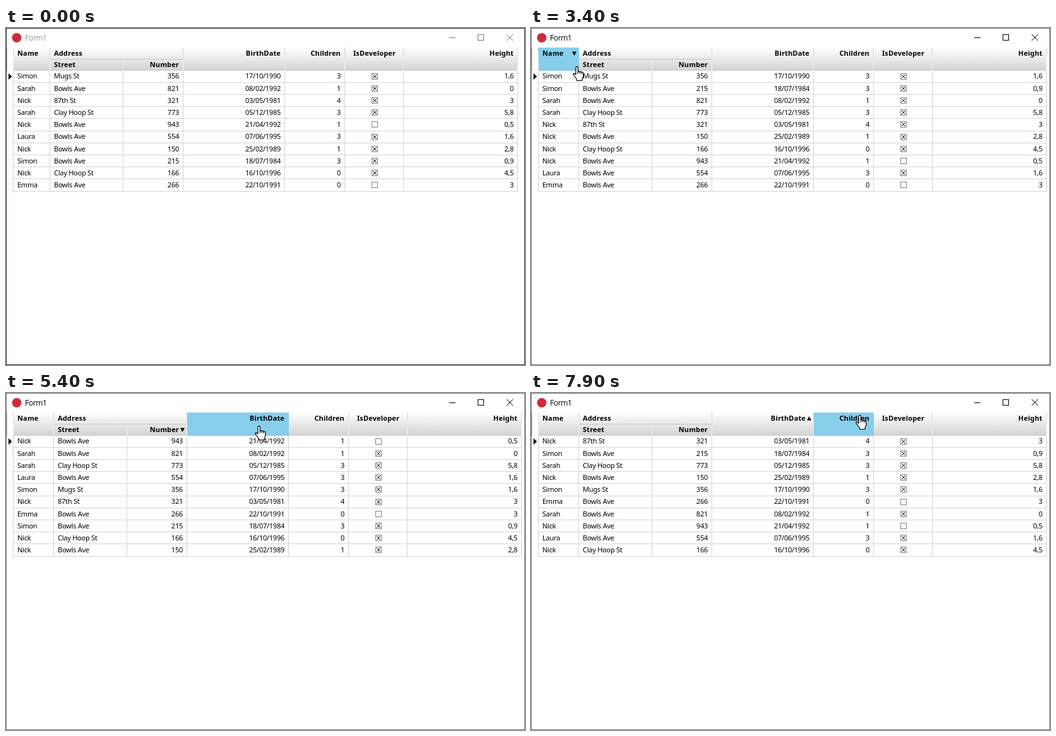
These frames come from a looping animation (822x535 px, 8000 ms). An HTML page with a canvas:

```html
<!DOCTYPE html>
<html lang="en">
<head>
<meta charset="utf-8">
<title>Form1</title>
<style>
html, body { margin: 0; width: 100%; height: 100%; overflow: hidden; background: #fff; }
canvas { display: block; }
</style>
</head>
<body>
<canvas id="stage" width="822" height="535"></canvas>
<script>
const ctx = document.getElementById('stage').getContext('2d');
const LOOP = 8000, STEP = 100, TOP = 31, MID = 49, HEAD = 68, PITCH = 19.2, LINE = '#d5d5d5';

const rows = `Simon|Mugs St|356|17/10/1990|3|x|1,6
Sarah|Bowls Ave|821|08/02/1992|1|x|0
Nick|87th St|321|03/05/1981|4|x|3
Sarah|Clay Hoop St|773|05/12/1985|3|x|5,8
Nick|Bowls Ave|943|21/04/1992|1||0,5
Laura|Bowls Ave|554|07/06/1995|3|x|1,6
Nick|Bowls Ave|150|25/02/1989|1|x|2,8
Simon|Bowls Ave|215|18/07/1984|3|x|0,9
Nick|Clay Hoop St|166|16/10/1996|0|x|4,5
Emma|Bowls Ave|266|22/10/1991|0||3`.split('\n').map(r => r.split('|'));

const titles = ['Name', 'Street', 'Number', 'BirthDate', 'Children', 'IsDeveloper', 'Height'];
const aligns = ['left', 'left', 'right', 'right', 'right', 'center', 'right'];
// each column ends with its grid line
const baseEdges = [11, 69, 185, 280, 441, 536, 629, 810];

// start time, row order, sorted column, direction (1 = ascending)
const sorts = [
  [0, '0123456789', -1, 0],
  [1800, '9568421307', 0, 1],
  [3000, '0713268459', 0, -1],
  [4200, '4135029786', 2, -1],
  [5700, '8541906372', 3, -1],
  [7200, '2736091458', 3, 1]
];

// time, x, y of the pointer
const path = [
  [1400, 150, 200], [1700, 31, 59], [3200, 31, 59], [3400, 66, 61],
  [4000, 233, 65], [4300, 233, 65], [4600, 255, 67], [4900, 277, 61],
  [5000, 277, 61], [5400, 394, 52], [5800, 394, 52], [6000, 432, 60],
  [6100, 432, 60], [6400, 413, 46], [7500, 413, 46], [7900, 514, 35], [LOOP, 514, 35]
];

const hand = new Path2D('M5 2A1.7 1.7 0 0 1 8.4 2V8Q10 7 11.2 8.5Q12.8 7.7 13.9 9.1Q16.6 8.6 16.8 11V15Q16.8 18 15 20V22.5H6.5V20.5Q5 18.5 2.5 15L.9 12.6Q.7 10.6 2.5 11L5 13Z');
const creases = new Path2D('M8.4 8V11.5M11.2 8.5V11.5M13.9 9.1V12');

function rect(x, y, w, h, color) {
  ctx.fillStyle = color;
  ctx.fillRect(x, y, w, h);
}

function text(str, x, y, align = 'left', font = '11px "Noto Sans", sans-serif', spacing = '-0.25px', color = '#000') {
  ctx.font = font;
  ctx.letterSpacing = spacing;
  ctx.textAlign = align;
  ctx.fillStyle = color;
  ctx.fillText(str, x, y);
}

const heading = (str, x, y, align) => text(str, x, y, align, 'bold 11px "Noto Sans", sans-serif', '0.15px');

function strokeLines(color, ...lines) {
  ctx.strokeStyle = color;
  ctx.lineWidth = 1;
  ctx.beginPath();
  for (const [x1, y1, x2, y2] of lines) {
    ctx.moveTo(x1, y1);
    ctx.lineTo(x2, y2);
  }
  ctx.stroke();
}

function triangle(...p) {
  ctx.fillStyle = '#000';
  ctx.beginPath();
  ctx.moveTo(p[0], p[1]);
  ctx.lineTo(p[2], p[3]);
  ctx.lineTo(p[4], p[5]);
  ctx.fill();
}

function gradient(from, to) {
  const g = ctx.createLinearGradient(0, TOP, 0, HEAD);
  g.addColorStop(0, from);
  g.addColorStop(1, to);
  return g;
}

function pointerAt(t) {
  if (t < path[0][0]) return null;
  const i = path.findIndex(p => p[0] > t);
  const [t0, x0, y0] = path[i - 1], [t1, x1, y1] = path[i];
  const k = (t - t0) / (t1 - t0);
  return { x: Math.round(x0 + (x1 - x0) * k), y: Math.round(y0 + (y1 - y0) * k) };
}

function drawWindow(active) {
  rect(0, 0, 822, 535, active ? '#777' : '#2b2b2b');
  rect(1, 1, 820, 533, '#fff');
  ctx.fillStyle = '#cf2b36';
  ctx.beginPath();
  ctx.arc(17, 15.5, 7.5, 0, 7);
  ctx.fill();
  text('Form1', 30, 20, 'left', '12px "Open Sans", sans-serif', '-0.4px', active ? '#000' : '#999');
  const ink = active ? '#000' : '#777';
  strokeLines(ink, [702, 15.5, 712, 15.5], [793, 10, 803, 20], [803, 10, 793, 20]);
  ctx.strokeRect(747.5, 10.5, 9, 9);
}

function cellX(edges, c) {
  if (aligns[c] === 'left') return edges[c] + 7;
  if (aligns[c] === 'right') return edges[c + 1] - 6;
  return (edges[c] + edges[c + 1]) / 2 + 1;
}

function drawHeader(edges, sorted, dir, pointer, flash) {
  const end = edges[7];
  rect(11, TOP, end - 10, HEAD - TOP, gradient('#fff', '#d2d2d2'));
  rect(1, TOP, 1, HEAD - TOP, '#bbb');
  rect(edges[1], MID, edges[3] - edges[1], 1, '#c6c6c6');
  const separator = gradient('#d0d0d0', '#fff');
  edges.forEach((x, i) => {
    const y = i === 2 ? MID + 1 : TOP;
    rect(x, y, 1, HEAD - y, separator);
  });

  titles.forEach((title, c) => {
    const low = c === 1 || c === 2, y = low ? MID + 1 : TOP;
    const left = edges[c], right = edges[c + 1];
    const tip = pointer && pointer.x + 6;
    if (pointer && !flash && tip > left && tip <= right && pointer.y >= y && pointer.y < HEAD)
      rect(left + 1, y, right - left, HEAD - y, '#87ceeb');
    const base = low ? 62 : 44;
    const shift = c === sorted && aligns[c] === 'right' ? 6 : 0;
    heading(title, cellX(edges, c) - shift, base, aligns[c]);
    if (c === sorted) {
      const x = right - 6.5, m = base - 3.5;
      triangle(x - 3.5, m + 3 * dir, x + 3.5, m + 3 * dir, x, m - 3.5 * dir);
    }
  });
  heading('Address', edges[1] + 7, 44, 'left');
}

function drawCheck(x, y, checked) {
  ctx.strokeStyle = '#808080';
  ctx.lineWidth = 1;
  ctx.strokeRect(x - 4.5, y - 4.5, 9, 9);
  if (checked) strokeLines('#000', [x - 3, y - 3, x + 3, y + 3], [x + 3, y - 3, x - 3, y + 3]);
}

function drawRows(edges, order) {
  [...order].forEach((n, i) => {
    const rowY = y => Math.round(y + PITCH * i);
    rect(11, rowY(85.8), edges[7] - 10, 1, LINE);
    rows[n].forEach((value, c) => {
      const x = cellX(edges, c);
      if (c === 5) drawCheck(Math.round(x), rowY(76.6), value);
      else text(value, x, rowY(80.4), aligns[c]);
    });
  });
  for (const x of edges) rect(x, HEAD, 1, 192, LINE);
  triangle(4, 72, 4, 82, 9.5, 77);
}

function drawPointer({ x, y }) {
  ctx.save();
  ctx.translate(x, y);
  ctx.fillStyle = '#fff';
  ctx.fill(hand);
  ctx.strokeStyle = '#000';
  ctx.lineWidth = 1.2;
  ctx.lineJoin = 'round';
  ctx.stroke(hand);
  ctx.stroke(creases);
  ctx.restore();
}

function draw(now) {
  const t = Math.floor(now % LOOP / STEP) * STEP;
  const [, order, sorted, dir] = sorts.filter(s => s[0] <= t).pop();
  // the first sort widens the Name column for its arrow
  const edges = baseEdges.map((x, i) => i && t >= 1800 ? x + 6 : x);
  const pointer = pointerAt(t);
  drawWindow(t >= 1700);
  drawHeader(edges, sorted, dir, pointer, t === 3000);
  drawRows(edges, order);
  if (pointer) drawPointer(pointer);
}

const start = performance.now();
function tick() {
  draw(performance.now() - start);
  requestAnimationFrame(tick);
}
tick();
</script>
</body>
</html>
```
